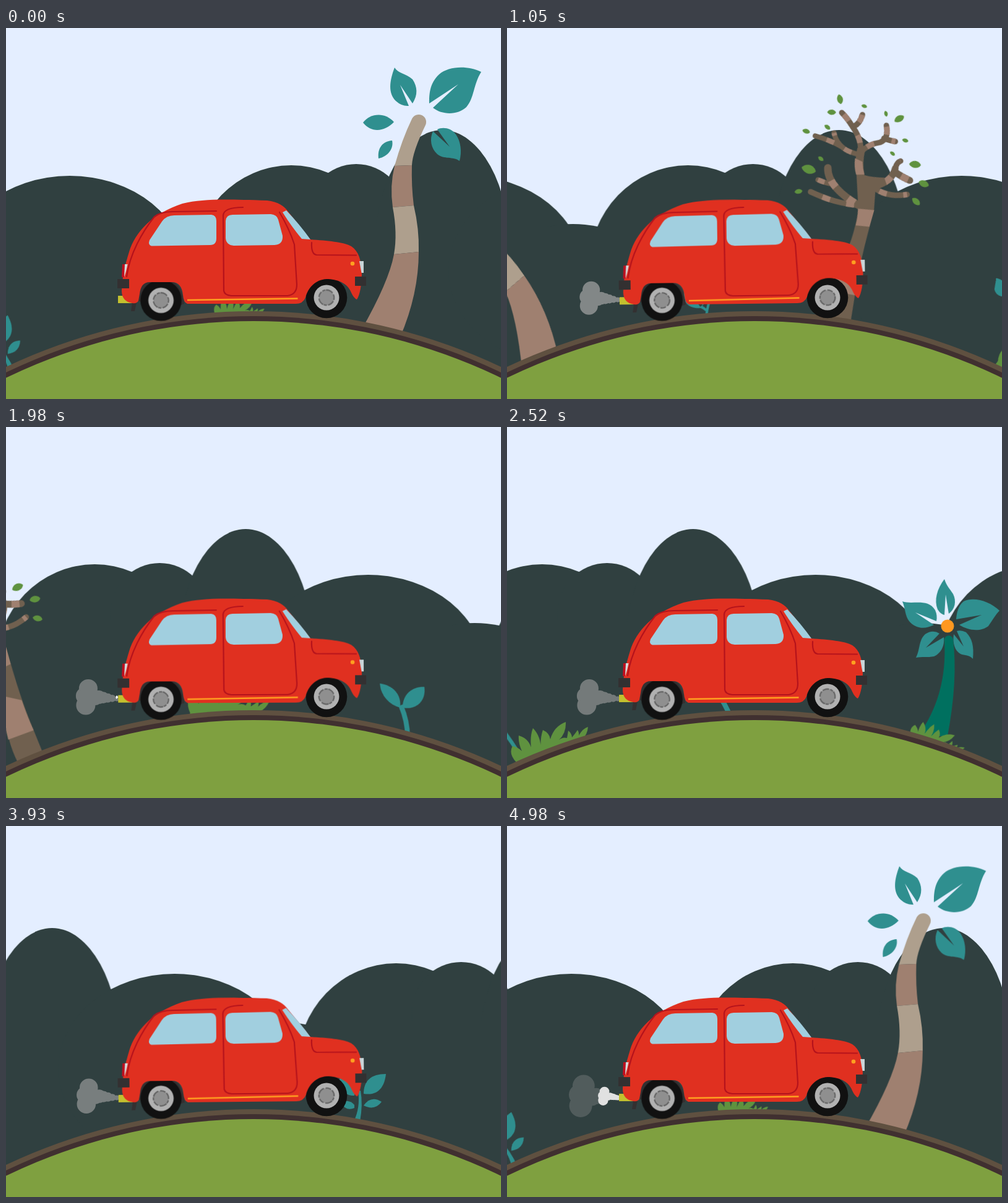
These frames come from a looping animation (800x600 px, 5010 ms). An HTML page:

```html
<!DOCTYPE html>
<html lang="en">
<head>
<meta charset="utf-8">
<title>Red car on a hill</title>
<style>
  html, body { margin: 0; width: 100%; height: 100%; overflow: hidden; background: #e4eeff; }
  svg { display: block; width: 800px; height: 600px; }
  .teal { fill: #2f8f8f; }
  .stem { fill: none; stroke: #2f8f8f; }
  .green { fill: #5f923f; }
  .tan { fill: #ae9f8d; }
  .brown { fill: #9f8070; }
  .bark { fill: #70604f; }
  .glass { fill: #a1cfdf; }
  .seam { fill: none; stroke: #b5121b; stroke-width: 2.2; stroke-linecap: round; }
  .dark { fill: #333031; }
  .hill { fill: #304040; }

  #hills { animation: drift 5010ms steps(167) infinite; }
  #world { transform-origin: 408px 1391px; animation: turn 5010ms steps(167) infinite; }
  .rock { transform-origin: 385px 355px; animation: rock 313.125ms ease-in-out infinite alternate; }
  #glint { animation: sweep 2505ms linear infinite; }
  .spin { animation: spin 501ms linear infinite; }

  /* one extra step past the wrap, so the last held step lands on it */
  @keyframes drift { to { transform: translateX(-803.82px); } }
  @keyframes turn { to { transform: rotate(-167.585deg); } }
  @keyframes rock { to { transform: rotate(-.9deg); } }
  @keyframes sweep {
    0%, 15.97% { transform: translateX(133px); }
    37.92%, 100% { transform: translateX(-185px); }
  }
  @keyframes spin { to { transform: rotate(360deg); } }
</style>
</head>
<body>
<svg viewBox="0 0 800 600" xmlns="http://www.w3.org/2000/svg">
  <defs>
    <g id="ridge" class="hill">
      <ellipse cx="103" cy="392" rx="188" ry="153"/>
      <ellipse cx="275" cy="367" rx="100" ry="50"/>
      <ellipse cx="461" cy="388" rx="160" ry="166"/>
      <ellipse cx="566" cy="302" rx="80" ry="82"/>
      <ellipse cx="705" cy="364" rx="110" ry="199"/>
      <rect y="322" width="802" height="278"/>
    </g>

    <path id="grass" class="green" transform="rotate(21.3 408 1391)" d="M15 542Q2 528 9 516Q18 518 24 524Q18 510 19 499
      Q34 503 39 518Q37 500 42 487Q55 500 55 523Q53 505 58 490Q69 495 70 505Q76 484 95 477Q96 495 84 506
      Q90 501 97 503Q98 498 99 491Q105 496 105 502Q111 495 114 490Q117 494 116 499Q123 487 131 485
      Q130 497 122 505L120 525L20 562Z"/>

    <g id="palm">
      <path class="tan" d="M628 223Q640 180 656 147A12 12 0 0 1 678 157Q657 200 656 222Z"/>
      <path class="brown" d="M628 223Q620 255 625 290L659 287Q655 255 656 222Z"/>
      <path class="tan" d="M625 290Q633 332 627 366L667 362Q668 325 659 287Z"/>
      <path class="brown" d="M627 366Q619 410 574 489L637 500Q667 430 667 362Z"/>
      <g class="teal">
        <path d="M768 71C745 60 715 62 700 75C684 90 684 108 684 122L731 91L690 129C705 141 730 141 744 128C757 113 755 92 768 71Z"/>
        <path d="M628 64C620 85 617 105 630 118Q640 127 651 126L637 92L657 122C666 108 665 95 657 83C646 73 634 74 628 64Z"/>
        <path d="M577 153C588 138 612 135 627 152C612 168 590 170 577 153Z"/>
        <path d="M624 182C627 195 617 208 602 211C600 195 608 183 624 182Z"/>
        <path d="M697 164L717 192L690 167C684 180 687 195 697 204C708 213 722 207 733 215C737 200 735 183 727 172C719 161 705 160 697 164Z"/>
      </g>
    </g>

    <g id="limbs" fill="none">
      <path stroke-width="9" d="M235 200Q232 182 212 166Q200 155 189 149M212 166Q222 160 222 143"/>
      <path stroke-width="9" d="M236 202Q244 186 262 178Q274 168 264 149M266 170Q274 171 285 170"/>
      <path stroke-width="8" d="M235 206Q200 210 186 184M203 202Q185 197 158 197"/>
      <path stroke-width="11" d="M277 246Q298 232 297 212M297 217Q310 222 325 224"/>
      <path stroke-width="9" d="M297 210Q297 201 302 198M270 250Q296 262 327 247"/>
      <path stroke-width="12" d="M262 287Q200 272 192 241"/>
      <path stroke-width="8" d="M206 264Q198 266 182 264"/>
      <path stroke-width="9" d="M262 284Q225 294 176 286"/>
    </g>
    <path id="leaf" class="green" d="M-8 0C-4 -7 5 -6 8 0C5 6 -4 6 -8 0Z"/>
    <g id="oak">
      <use href="#limbs" stroke="#70604f" stroke-linecap="round"/>
      <use href="#limbs" stroke="#9f8070" stroke-dasharray="0 13 13 14"/>
      <path class="bark" d="M258 500L253 472Q244 430 254 387Q265 345 258 292L240 240Q230 220 229 197L242 197Q243 218 252 236
        Q266 236 284 231L291 241L276 255L283 288Q283 370 291 427L300 500Z"/>
      <path class="brown" d="M247.500 431Q247 410 254 387L260 362L285 375Q287 404 291 427Z"/>
      <path class="brown" d="M261 318Q261 305 257 291L283 286V314Z"/>
      <path class="brown" d="M230 214L243 216Q246 226 252 235L239 239Q232 228 230 214Z"/>
      <g id="leaves"></g>
    </g>

    <g id="flower">
      <path fill="#00705f" d="M707 346A7 7 0 0 1 721 343Q729 410 712 500L664 500Q712 435 707 346Z"/>
      <g class="teal">
        <path d="M707 246C695 262 690 280 696 295Q701 303 707 304L709 271L714 302C724 295 727 282 721 270C716 262 711 258 707 246Z"/>
        <path d="M796 297C780 282 755 274 738 282C729 290 727 300 726 311L767 304L731 320C745 329 765 332 778 322C785 312 790 303 796 297Z"/>
        <path d="M639 282C655 288 680 276 692 296Q696 305 694 314L660 300L690 320C675 328 660 326 650 314C643 305 644 293 639 282Z"/>
        <path d="M661 373C668 360 665 345 676 335Q688 327 699 334L677 357L706 340C708 355 700 367 690 371C680 373 670 371 661 373Z"/>
        <path d="M753 375C755 355 752 342 742 332Q734 328 727 330L738 355L722 335C720 350 724 362 733 367C740 370 747 368 753 375Z"/>
      </g>
      <circle cx="712" cy="322" r="10.5" fill="#ff9820"/>
    </g>

    <g id="sprig" class="teal">
      <path d="M562 478H572Q577 450 573 428H569Q573 455 562 478Z"/>
      <path d="M578 433C578 412 590 401 614 401C612 420 603 437 578 433Z"/>
      <path d="M578 452Q590 435 607 446Q596 461 578 452Z"/>
      <path d="M563 436C565 420 558 408 540 403C536 420 545 437 563 436Z"/>
      <path d="M563 451Q553 440 541 448Q550 462 563 456Z"/>
    </g>

    <g id="sprout">
      <path class="stem" stroke-width="4" d="M69 522Q67 508 68 497M68 517Q62 514 54 513"/>
      <path class="teal" d="M22 484C37 484 52 487 58 500Q62 508 58 515C45 522 26 518 25 500Q25 491 22 484Z"/>
      <path class="teal" d="M82 452C94 468 98 488 80 497Q72 501 63 498C58 482 62 473 72 467Q80 462 82 452Z"/>
      <path class="hill" d="M37 499L59 510L56 514ZM81 474L70 499L66 497Z"/>
    </g>

    <g id="reed">
      <path class="stem" stroke-width="6" d="M552 482Q558 420 545 345"/>
      <g class="teal">
        <path d="M561 318C545 320 533 330 533 348Q540 352 552 348C560 340 558 328 561 318Z"/>
        <path d="M503 337C515 336 524 342 530 355C526 366 510 366 505 355Z"/>
        <path d="M580 374C572 362 556 360 546 372C552 386 570 384 580 374Z"/>
      </g>
    </g>

    <g id="shoot">
      <path class="stem" stroke-width="8" d="M361 470Q354 447 335 425"/>
      <path class="teal" d="M339 428C332 405 345 390 362 385C372 405 362 425 339 428ZM335 429C315 430 298 418 292 402C312 398 332 408 335 429Z"/>
    </g>

    <g id="tyre">
      <circle r="33.3" fill="#111"/>
      <circle r="20.5" fill="#b1b1b1"/>
      <g class="spin">
        <circle r="12.3" fill="#8f8f8f" stroke="#646464" stroke-width="2.2" stroke-dasharray="9 2 5 1 12 3"/>
      </g>
    </g>

    <path id="panes" d="M232 343L252 313Q259 303 272 303L332 302Q340 303 340 312V340Q340 351 330 351L235 352.5Q229 351 232 343Z
      M355 312Q356 302 366 302L428 301Q438 302 440 310L447 336Q448 350 434 351L368 352Q356 351 355 340Z"/>
    <clipPath id="paneClip"><use href="#panes"/></clipPath>
  </defs>

  <rect width="800" height="600" fill="#e4eeff"/>
  <g id="hills">
    <use href="#ridge"/>
    <use href="#ridge" x="800"/>
  </g>

  <g id="world">
    <use href="#palm"/>
    <use href="#palm" transform="rotate(166.85 408 1391)"/>
    <use href="#sprig" transform="rotate(131.46 408 1391)"/>
    <use href="#sprig" transform="rotate(-35.39 408 1391)"/>
    <use href="#sprout" transform="rotate(51.18 408 1391)"/>
    <use href="#oak" transform="rotate(51.18 408 1391)"/>
    <use href="#reed" transform="rotate(51.18 408 1391)"/>
    <use href="#shoot" transform="rotate(84.29 408 1391)"/>
    <use href="#flower" transform="rotate(84.29 408 1391)"/>
    <use href="#grass" transform="rotate(-2.1 408 1391) translate(408 461) scale(.62) translate(-408 -456)"/>
    <use href="#grass" transform="rotate(164.75 408 1391) translate(408 461) scale(.62) translate(-408 -456)"/>
    <use href="#grass" transform="rotate(62.99 408 1391)"/>
    <use href="#grass" transform="rotate(102.06 408 1391) translate(408 466) scale(.7) translate(-408 -456)"/>
  </g>

  <g id="ground">
    <circle cx="400" cy="1391" r="933" fill="#5f5040"/>
    <circle cx="400" cy="1391" r="925" fill="#403030"/>
    <circle cx="400" cy="1391" r="917" fill="#7fa040"/>
  </g>

  <path id="puffA"/>
  <path id="puffB"/>

  <g id="car">
    <g class="rock">
      <path class="dark" d="M214 441L216 424Q220 410 236 410H266Q284 412 288 446L250 460ZM204 444H211L208 458H202Z"/>
      <path fill="#c3c02f" d="M181 433H198L204 445H181Z"/>
    </g>
    <use href="#tyre" x="250.5" y="440.5"/>
    <use href="#tyre" x="518" y="436"/>
    <g class="rock">
      <path fill="#e03020" d="M187 425C188 400 192 385 199 362C209 330 236 300 285 284C320 276 350 277 422 279
        C440 281 450 288 456 297L492 342C520 344 545 346 558 353C570 361 574 375 575 395C575 415 572 432 567 439
        Q562 437 558 428C552 412 535 406 518 406C500 407 488 420 484 436Q480 446 468 446H293Q287 444 286 432
        Q284 411 268 411H232Q218 411 216 430L214 441Q212 446 204 445Q187 442 187 425Z"/>
      <use href="#panes" class="glass"/>
      <g clip-path="url(#paneClip)">
        <path id="glint" fill="#ccd0e8" fill-opacity=".38" d="M331 354L370 300H380L342 354ZM353 354L386 300H392L359 354ZM370 354L402 300H406L374 354Z"/>
      </g>
      <path class="glass" d="M447 298L453 295Q475 318 492 342L478 341Q462 322 447 298Z"/>
      <path class="seam" d="M195 402C200 365 220 330 240 305Q250 297 270 297L340 296"/>
      <path class="seam" d="M383 290Q352 290 351 303L352 425Q353 432 364 433H455Q470 431 470 415L466 350Q458 325 442 298"/>
      <path class="seam" d="M494 347Q493 366 502 367L566 367.5"/>
      <path fill="#c00e1e" d="M188 382H192L191 403H187Z"/>
      <path fill="#d5d8da" d="M192 382H196.5Q194 395 191 403Z"/>
      <path fill="#c9d5d8" d="M571 377H578V396H574.5Z"/>
      <rect class="dark" x="180" y="406" width="19" height="15"/>
      <rect class="dark" x="564" y="402" width="18" height="15"/>
      <circle cx="560" cy="381" r="3.3" fill="#ffa020"/>
      <path stroke="#ffa020" stroke-width="2.5" d="M293 440L471.5 437.5"/>
    </g>
  </g>
</svg>

<script>
  const LOOP = 5010, STEP = 30, CYCLE = 1425, GAP = 540;
  const byId = id => document.getElementById(id);

  // small tree leaves: x, y, turn, size
  const leaves = [
    [180, 129, 60, 1], [221, 129, 0, .6], [258, 131, 60, .6], [281, 133, -45, 1.1], [300, 164, 0, .65],
    [173, 153, -15, .9], [173, 178, 20, .7], [142, 194, 0, .8], [286, 190, 20, .6], [326, 197, -10, 1.2],
    [348, 223, 5, 1.1], [344, 254, 25, 1], [177, 230, 20, .65], [163, 252, 0, 1.5], [157, 291, -25, .8]
  ];
  byId('leaves').innerHTML = leaves.map(([x, y, turn, size]) =>
    `<use href="#leaf" transform="translate(${x} ${y}) rotate(${turn}) scale(${size})"/>`).join('');

  const clamp = v => Math.min(1, Math.max(0, v));
  function track(points, t) {
    let i = 1;
    while (i < points.length - 1 && t > points[i][0]) i++;
    const [t0, a] = points[i - 1], [t1, b] = points[i];
    return a + (b - a) * clamp((t - t0) / (t1 - t0));
  }
  const disc = (x, y, r) => `M${x - r} ${y}a${r} ${r} 0 1 1 ${2 * r} 0a${r} ${r} 0 1 1 ${-2 * r} 0Z`;

  // smoke by age in ms
  const frontX = [[0, 181], [97, 158], [165, 147], [420, 127], [550, 113], [630, 111], [705, 100], [820, 92]];
  const halfH = [[0, 1], [97, 10], [165, 15], [420, 23], [550, 28.5], [630, 29.5], [705, 34], [820, 38]];
  const tailX = [[560, 179], [630, 158], [705, 146], [820, 135]];
  const opacity = [[420, 1], [550, .62], [630, .58], [705, .3], [800, 0]];
  const lobes = [[3, -14, 15], [-3, -2, 14], [-1, 13, 15.5], [14, 1, 12]];

  function puff(el, age) {
    const fade = track(opacity, age);
    if (age <= 0 || fade <= 0) return el.setAttribute('d', '');
    const k = track(halfH, age) / 28.5;
    const cx = track(frontX, age) + 17 * k, cy = 437;
    let d = lobes.map(([x, y, r]) => disc(cx + x * k, cy + y * k, r * k)).join('');
    const from = cx + 20 * k, to = track(tailX, age);
    for (let i = 0; i <= 4; i++) {
      const u = i / 4, r = 11 * k * (1 - u) + 4 * u;
      if (to > from) d += disc(from + (to - from) * u, cy + 2.5 * u, r);
    }
    const tone = Math.round(255 - 95 * clamp((age - 90) / 240));
    el.setAttribute('d', d);
    el.setAttribute('fill', `rgb(${tone},${tone},${tone})`);
    el.setAttribute('fill-opacity', fade);
  }

  const start = performance.now();
  function draw() {
    const t = Math.floor((performance.now() - start) % LOOP / STEP) * STEP;
    const phase = t % CYCLE;
    puff(byId('puffA'), phase);
    puff(byId('puffB'), phase - GAP);
    requestAnimationFrame(draw);
  }
  draw();
</script>
</body>
</html>
```
